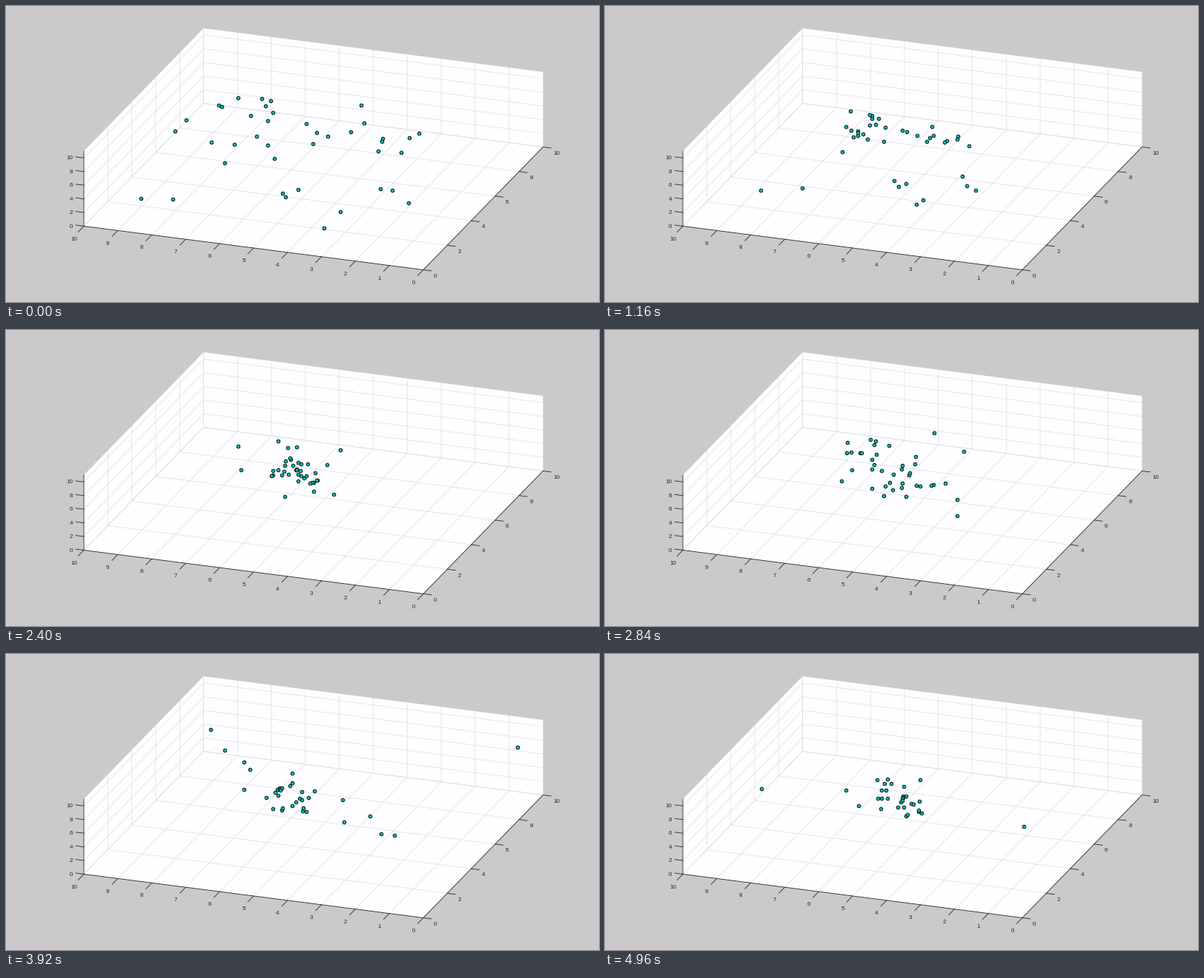
A matplotlib script that plays this animation: 800x400 px, repeating every 5000 ms.

```python
import matplotlib.pyplot as plt
import numpy as np
from matplotlib.animation import FuncAnimation

plt.rcParams["font.family"] = "Liberation Sans"

FRAMES, INTERVAL = 125, 40
DARK, GRID = "#262626", "#dedede"

# Screen position of the data origin and of one unit along each axis
ORIGIN = np.array([562.5, 356.0])
UX = np.array([-45.8, -5.9])
UY = np.array([16.15, -16.6])
UZ = np.array([0.0, -9.22])
LIMITS = np.array([10, 10, 11])

# Bodies at rest, as seen on screen
START = np.array([
    312, 123.5, 344, 124.5, 356.5, 127, 349, 134, 286, 134,
    290, 136, 359, 143.5, 329, 147, 352, 154, 242, 153.5,
    227.5, 168, 337, 175, 276.5, 183, 307, 186, 352, 187.5,
    361, 205, 294, 211.5, 404, 158.5, 418.5, 170, 433, 175.5,
    413.5, 185.5, 464, 169, 478, 133, 482.5, 158, 507, 179,
    506.5, 182, 501, 195, 532, 197.5, 543.5, 178, 556, 171.5,
    372.5, 252.5, 376.5, 257, 393, 247, 504, 246, 520, 248,
    542, 265, 450, 277, 428.5, 299.5, 181.5, 259, 224.5, 260,
]).reshape(-1, 2)

GRAVITY, SOFTENING, SUBSTEPS = 1.8, 0.5, 10


def project(p):
    p = np.asarray(p, float)
    return ORIGIN + p @ np.array([UX, UY, UZ])


def lift(screen, rng):
    """Place screen points in the box at a random depth along the view line."""
    sx, sy = screen.T
    slope = -UY[0] / UX[0]
    x0 = (sx - ORIGIN[0]) / UX[0]
    rise = ORIGIN[1] + UX[1] * x0 - sy
    per_y = -(UY[1] + UX[1] * slope)
    low = np.clip((rise + 10 * UZ[1]) / per_y, 0, 10)
    high = np.clip(rise / per_y, 0, 10)
    high = np.maximum(low, np.minimum(high, (10 - x0) / slope))
    y = low + (high - low) * rng.uniform(0.05, 0.95, len(sx))
    return np.column_stack([x0 + slope * y, y, (rise - per_y * y) / -UZ[1]])


def pull(pos):
    d = pos[None, :, :] - pos[:, None, :]
    r2 = (d ** 2).sum(axis=2) + SOFTENING ** 2
    return GRAVITY * (d / r2[:, :, None] ** 1.5).sum(axis=1)


def simulate():
    """Collapse under mutual gravity, integrated with leapfrog steps."""
    pos = lift(START, np.random.default_rng(7))
    vel = np.zeros_like(pos)
    acc = pull(pos)
    dt = INTERVAL / 1000 / SUBSTEPS
    path = [pos.copy()]
    for _ in range(FRAMES - 1):
        for _ in range(SUBSTEPS):
            vel += acc * dt / 2
            pos += vel * dt
            acc = pull(pos)
            vel += acc * dt / 2
        path.append(pos.copy())
    return np.array(path)


fig = plt.figure(figsize=(8, 4), dpi=100, facecolor="#cbc9cc")
ax = fig.add_axes([0, 0, 1, 1])
ax.set_xlim(-0.5, 799.5)
ax.set_ylim(399.5, -0.5)
ax.axis("off")


def face(*corners):
    ax.fill(*project(corners).T, color="#fefdff", lw=0, zorder=0)


def line(*points, color=GRID, width=0.5, z=1):
    ax.plot(*project(points).T, color=color, lw=width, zorder=z)


def tick(point, direction, text, offset, align):
    start = project(point)
    end = start + 11 * direction / np.hypot(*direction)
    ax.plot(*np.array([start, end]).T, color=DARK, lw=0.6, zorder=2)
    ax.text(*(start + offset), text, fontsize=5.8, color=DARK,
            ha=align, va="center_baseline")


face((0, 0, 0), (10, 0, 0), (10, 10, 0), (0, 10, 0))
face((10, 0, 0), (10, 10, 0), (10, 10, 11), (10, 0, 11))
face((0, 10, 0), (10, 10, 0), (10, 10, 11), (0, 10, 11))

for x in range(1, 11):
    line((x, 0, 0), (x, 10, 0), (x, 10, 11))
for y in range(2, 11, 2):
    line((0, y, 0), (10, y, 0), (10, y, 11))
for z in range(0, 11, 2):
    line((10, 0, z), (10, 10, z), (0, 10, z))

line((10, 0, 11), (10, 0, 0), (0, 0, 0), (0, 10, 0),
     color=DARK, width=0.6, z=2)
for x in range(11):
    tick((x, 0, 0), -UY, str(x), (-13.5, 16.7), "center")
for v in range(0, 11, 2):
    tick((0, v, 0), -UX, str(v), (14, 7.8), "left")
    tick((10, 0, v), UX, str(v), (-15, -0.3), "right")

path = simulate()
dots, = ax.plot([], [], "o", ms=3.3, mew=0.7, mec="#001414",
                mfc=(0, 0.75, 0.72), zorder=3)


def draw(i):
    pos = path[i]
    inside = ((pos > -0.1) & (pos < LIMITS + 0.1)).all(axis=1)
    dots.set_data(*project(pos[inside]).T)
    return dots,


anim = FuncAnimation(fig, draw, frames=FRAMES, interval=INTERVAL,
                     repeat=True, repeat_delay=0)
plt.show()
```
